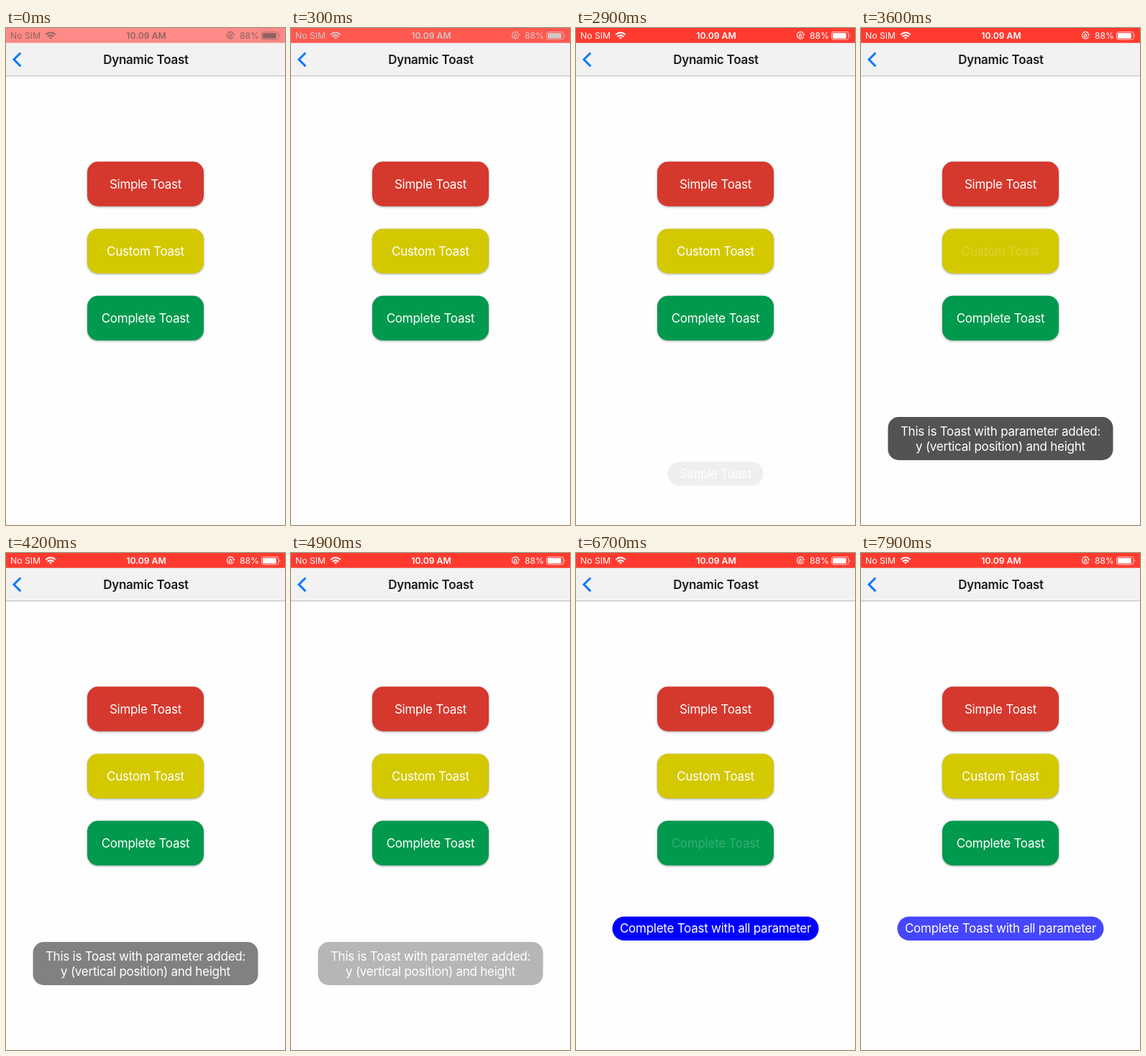
Write an HTML page that moves like this. It is 388x690 px and loops after 8000 ms.

```html
<!DOCTYPE html>
<html lang="en">
<head>
<meta charset="utf-8">
<title>Dynamic Toast</title>
<style>
  html, body { margin: 0; width: 100%; height: 100%; overflow: hidden; background: #fefefe; }
  svg { display: block; width: 388px; height: 690px; }
  text { font: 17px Inter, Roboto, sans-serif; letter-spacing: -.25px; fill: #fff; text-anchor: middle; }
  .title { font-weight: 600; fill: #1c1c1c; }
  #status text { font-size: 12.2px; letter-spacing: 0; fill: currentColor; }
  #status .clock { font-weight: 600; }
  .button rect { filter: drop-shadow(0 1.5px 1.5px rgba(0, 0, 0, .35)); }
</style>
</head>
<body>
<svg viewBox="0 0 388 690">
  <rect width="388" height="690" fill="#fefefe"/>
  <rect y="20" width="388" height="46" fill="#f2f2f2"/>
  <path d="M0 66.5H388" stroke="#bcbcbc"/>
  <path d="M20.3 34.5L11 43.8L20.3 53.1" fill="none" stroke="#0a7aff" stroke-width="3"/>
  <text class="title" x="194.5" y="49.5">Dynamic Toast</text>

  <rect id="bar" width="388" height="20.7"/>
  <g id="status">
    <text x="27" y="15">No SIM</text>
    <g fill="none" stroke="currentColor" stroke-width="2">
      <path d="M55.2 9.2Q62 3.2 68.8 9.2M57.7 12Q62 8.2 66.3 12"/>
      <path d="M60 13.2Q62 11.6 64 13.2L62 15.4Z" fill="currentColor" stroke="none"/>
      <path d="M316.3 7.6A4.8 4.8 0 1 0 316.6 12.2" stroke-width="1.1"/>
      <path d="M314.9 8.5H318.3L316.8 11Z" fill="currentColor" stroke="none"/>
      <path d="M310.3 9.8H313.9V12.5H310.3ZM311 9.8V8.6Q312.1 7 313.2 8.6V9.8" stroke-width=".9"/>
      <rect x="355.5" y="5.5" width="23.5" height="10.5" rx="2.5" stroke-width="1" opacity=".75"/>
      <path d="M380.6 8.8Q382.3 10.7 380.6 12.6Z" fill="currentColor" stroke="none"/>
      <rect x="357" y="7" width="18.8" height="7.5" rx="1.2" fill="currentColor" stroke="none"/>
    </g>
    <text class="clock" x="195" y="15">10.09 AM</text>
    <text x="338.5" y="15">88%</text>
  </g>
  <g id="stage"></g>
</svg>
<script>
const LOOP = 8000;
const $ = id => document.getElementById(id);
const clamp = v => Math.min(1, Math.max(0, v));
const mix = (a, b, k) => `rgb(${a.map((v, i) => v + (b[i] - v) * k)})`;

// press: finger down; show: finger up and toast appears; fade: start of fade-out
const actions = [
  { label: 'Simple Toast', color: '#d5382d', y: 185.5, press: 350, show: 520, fade: 620, span: 3000,
    box: [127.5, 602, 133, 33.5, 16.7], fill: '#000', alpha: .67, lines: ['Simple Toast'], base: 625 },
  { label: 'Custom Toast', color: '#d4c800', y: 278.7, press: 3380, show: 3550, fade: 3680, span: 3000,
    box: [37.5, 540, 313, 60, 15], fill: '#000', alpha: .67,
    lines: ['This is Toast with parameter added:', 'y (vertical position) and height'], base: 566 },
  { label: 'Complete Toast', color: '#00994d', y: 371.8, press: 6450, show: 6620, fade: 7000, span: 5000,
    box: [50.5, 504.7, 287, 33.3, 16.6], fill: '#00f', alpha: 1, lines: ['Complete Toast with all parameter'], base: 527.3 },
];

const rect = ([x, y, w, h, r], fill, alpha = 1) =>
  `<rect x="${x}" y="${y}" width="${w}" height="${h}" rx="${r}" fill="${fill}" fill-opacity="${alpha}"/>`;

$('stage').innerHTML = actions.map(a => `
  <g class="button">${rect([113, a.y, 162, 62, 15], a.color)}<text x="194" y="${a.y + 37.4}">${a.label}</text></g>
  <g class="toast">${rect(a.box, a.fill, a.alpha)}${a.lines.map((s, i) =>
    `<text x="194" y="${a.base + i * 20.8}">${s}</text>`).join('')}</g>`).join('');
const labels = document.querySelectorAll('.button text');
const toasts = document.querySelectorAll('.toast');

// cubic-bezier(0, 0, .58, 1)
function easeOut(x) {
  let lo = 0, hi = 1;
  for (let i = 0; i < 20; i++) {
    const s = (lo + hi) / 2;
    if (1.74 * s * s * (1 - s) + s ** 3 < x) lo = s; else hi = s;
  }
  return lo * lo * (3 - 2 * lo);
}

function draw(t) {
  const k = clamp((t - 50) / 400);
  $('bar').setAttribute('fill', mix([255, 138, 135], [255, 59, 48], k));
  $('status').style.color = mix([142, 100, 98], [255, 255, 255], k);
  actions.forEach((a, i) => {
    const back = clamp((t - a.show - 80) / 300);
    labels[i].style.opacity = t < a.press ? 1 : .2 + .8 * back;
    toasts[i].style.opacity = t < a.show ? 0 : 1 - easeOut(clamp((t - a.fade) / a.span));
  });
}

const start = performance.now();
function tick() {
  draw((performance.now() - start) % LOOP);
  requestAnimationFrame(tick);
}
tick();
</script>
</body>
</html>
```
